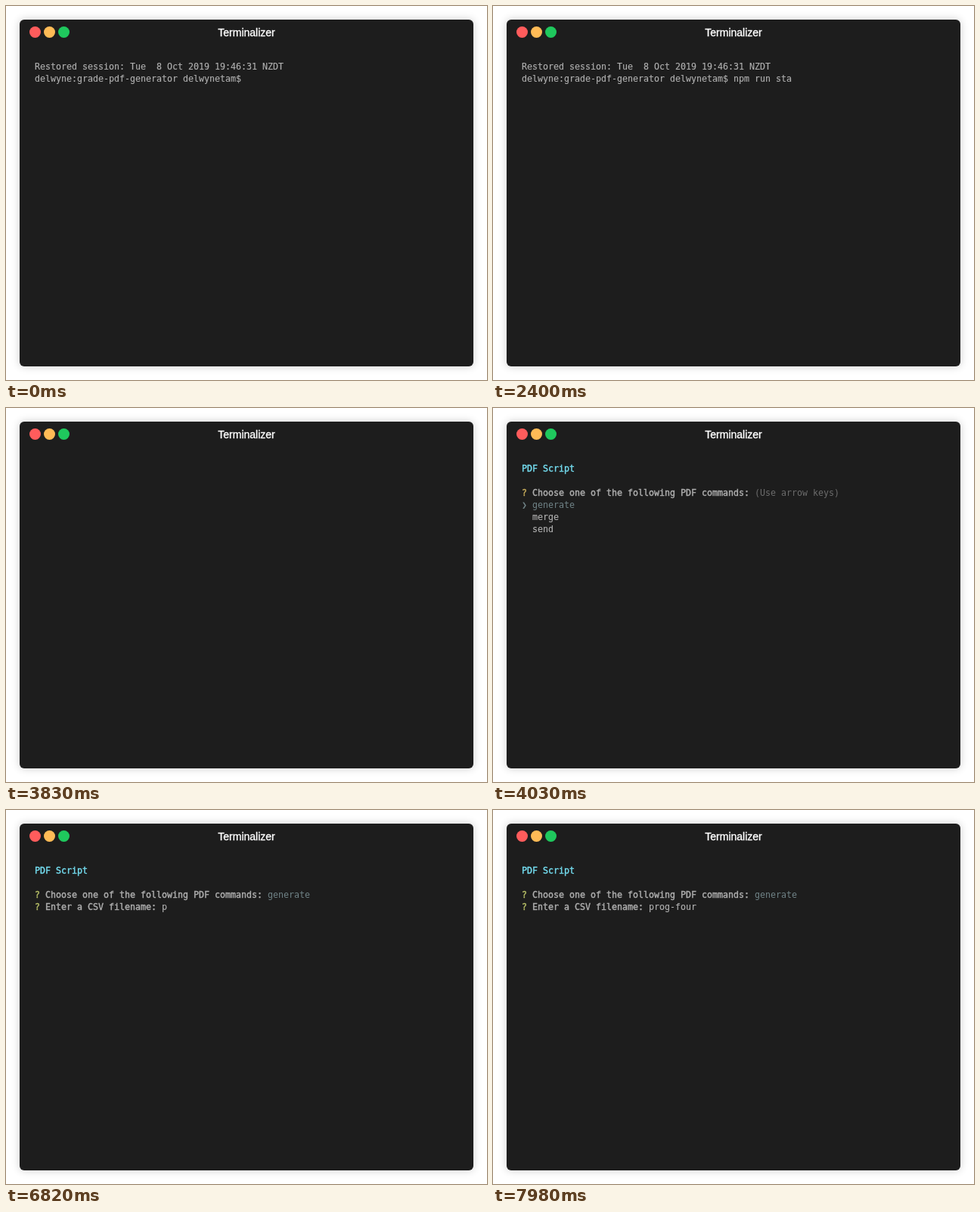
Write an HTML page that moves like this. It is 636 px wide and 494 px high and loops after 8 s.

```html
<!DOCTYPE html>
<html lang="en">
<head>
<meta charset="utf-8">
<title>Terminal</title>
<style>
  html, body { margin: 0; width: 100%; height: 100%; overflow: hidden; background: #fff; }
  #win {
    position: absolute; left: 18px; top: 18px; width: 600px; height: 458px;
    border-radius: 6px; background: #1d1d1d; box-shadow: 0 0 12px rgba(0, 0, 0, .2);
  }
  .dot { position: absolute; top: 9px; width: 15px; height: 15px; border-radius: 50%; }
  #title {
    position: absolute; top: 9px; width: 100%; text-align: center; color: #fff;
    font: 14px/16px "Liberation Sans", Arial, sans-serif; -webkit-text-stroke: .35px;
  }
  #screen {
    position: absolute; left: 20px; top: 54px; white-space: pre; color: #afafaf;
    font: 11.63px/16px "DejaVu Sans Mono", monospace; -webkit-text-stroke: .15px;
  }
  #screen div { height: 16px; }
  b { font-weight: normal; -webkit-text-stroke: .4px; }
  .head { color: #75dff2; }
  .ask { color: #c9ae5c; }
  .done { color: #b9c168; }
  .pick { color: #708387; -webkit-text-stroke: 0; }
  .hint { color: #6c6c6c; -webkit-text-stroke: 0; }
</style>
</head>
<body>
<div id="win">
  <div class="dot" style="left:13px;background:#ff5c5c"></div>
  <div class="dot" style="left:32px;background:#ffbb56"></div>
  <div class="dot" style="left:51px;background:#1fc85d"></div>
  <div id="title">Terminalizer</div>
  <div id="screen"></div>
</div>
<script>
const LOOP = 8000;
const screenEl = document.getElementById('screen');
const project = 'grade-pdf-generator';
const user = 'delwynetam';

// Key press times, one per character
const commandKeys = [500, 730, 970, 1240, 1510, 1600, 1780, 1950, 2120, 2220, 2330, 2430, 2530];
const fileKeys = [6820, 6930, 7050, 7160, 7440, 7560, 7710, 7900, 7980];

const typed = (text, keys, t) => text.slice(0, keys.filter(k => k <= t).length);
const span = (name, text) => `<span class="${name}">${text}</span>`;
const bold = (name, text) => `<b class="${name}">${text}</b>`;

function shell(t) {
  const rows = [
    'Restored session: Tue  8 Oct 2019 19:46:31 NZDT',
    `delwyne:${project} ${user}$ ` + typed('npm run start', commandKeys, t)
  ];
  if (t >= 3430) rows.push('',
    `&gt; ${project}@1.0.0 start /Users/${user}/Desktop/${project}`,
    '&gt; node index.js');
  return rows;
}

function script(t) {
  const rows = [bold('head', 'PDF Script'), ''];
  if (t < 4030) return rows;
  const question = mark => bold(mark, '?') + bold('', ' Choose one of the following PDF commands: ');
  if (t < 5860) return rows.concat(
    question('ask') + span('hint', '(Use arrow keys)'),
    span('pick', '❯ generate'), '  merge', '  send');
  return rows.concat(
    question('done') + span('pick', 'generate'),
    bold('done', '?') + bold('', ' Enter a CSV filename: ') + typed('prog-four', fileKeys, t));
}

function rowsAt(t) {
  if (t < 3830) return shell(t);
  return t < 3930 ? [] : script(t);
}

let shown;
function draw(now) {
  const html = rowsAt(now % LOOP).map(row => `<div>${row}</div>`).join('');
  if (html !== shown) screenEl.innerHTML = shown = html;
  requestAnimationFrame(draw);
}
draw(performance.now());
</script>
</body>
</html>
```
